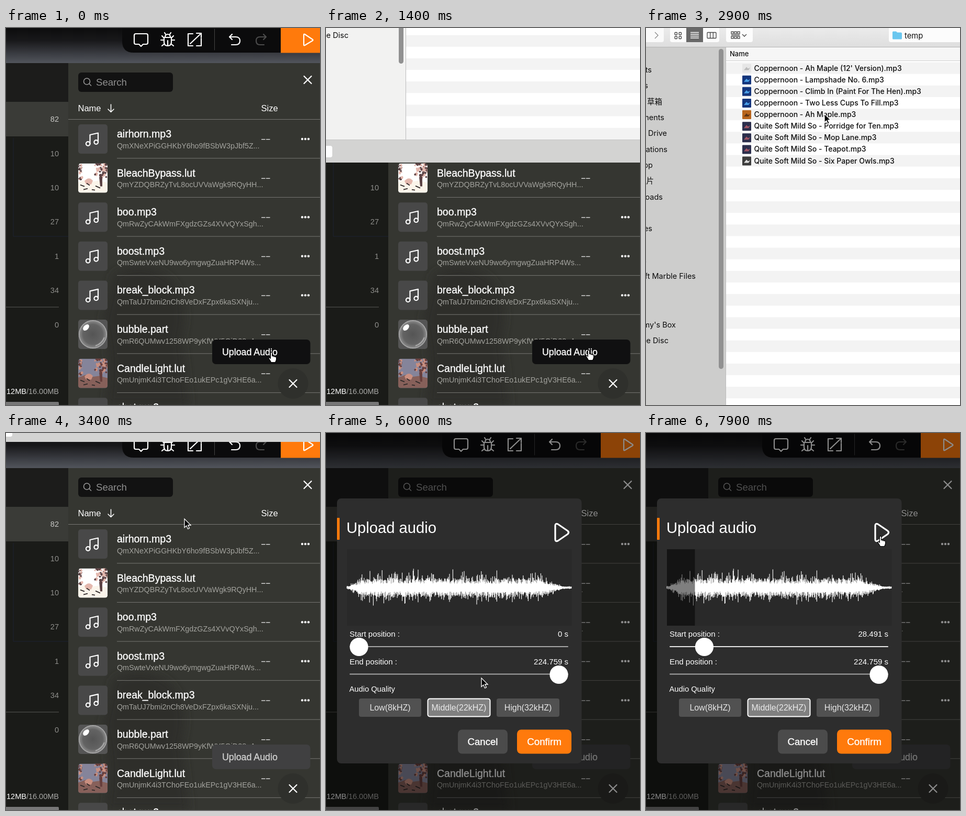
An HTML page that plays this animation: 600x720 px, repeating every 8000 ms.

```html
<!DOCTYPE html>
<html lang="en">
<head>
<meta charset="utf-8">
<title>Upload audio</title>
<style>
html, body { margin: 0; width: 100%; height: 100%; overflow: hidden; background: #1a1b18; }
svg { display: block; width: 600px; height: 720px; font-family: "Liberation Sans", Arial, sans-serif; }
#sheet { font-family: Inter, "Noto Sans CJK SC", "Noto Sans CJK", sans-serif; }
.line { fill: none; stroke: #fff; stroke-width: 2.2; stroke-linecap: round; stroke-linejoin: round; }
</style>
</head>
<body>
<svg viewBox="0 0 600 720" xmlns="http://www.w3.org/2000/svg">
  <defs>
    <linearGradient id="sky" x1="0" y1="0" x2="0" y2="1">
      <stop offset="0" stop-color="#0c0c0d"/><stop offset=".35" stop-color="#18181a"/>
      <stop offset=".75" stop-color="#3d3f45"/><stop offset="1" stop-color="#53565d"/>
    </linearGradient>
    <linearGradient id="bar" x1="0" y1="0" x2="0" y2="1">
      <stop offset="0" stop-color="#ebebeb"/><stop offset="1" stop-color="#dedede"/>
    </linearGradient>
    <radialGradient id="ball">
      <stop offset="0" stop-color="#555"/><stop offset=".7" stop-color="#636363"/>
      <stop offset=".92" stop-color="#858585"/><stop offset="1" stop-color="#c4c4c4"/>
    </radialGradient>
    <filter id="soft"><feGaussianBlur stdDeviation="9"/></filter>
    <clipPath id="thumb"><rect width="56" height="56" rx="5"/></clipPath>
  </defs>
  <g id="app"></g>
  <rect id="dim" width="600" height="720" fill="#000" opacity=".45"/>
  <g id="modal"></g>
  <g id="sheet"></g>
  <path id="arrow" d="M0 0V16.5L3.8 13 6.6 19.2 9.4 18 6.7 12H12Z" fill="#000" stroke="#fff" stroke-width="1.3"/>
  <path id="hand" d="M-1.6 1.5C-1.6-.6 1.6-.6 1.6 1.5V8C2.2 6.6 4.5 6.8 4.6 8.4C5.2 7.4 7 7.8 7.2 9.2C8 8.6 9.6 9 9.6 10.5V14C9.6 16 8.2 17 7.8 19.5H-.5C-1 17-4.5 13.5-5 11.8C-5 10-3 10.2-1.6 12Z"
    fill="#fff" stroke="#000" stroke-width="1.2"/>
</svg>
<script>
const $ = id => document.getElementById(id);
const LOOP = 8000, STEP = 100, LENGTH = 224.759, START = 28.491;

const text = (x, y, s, size, fill = '#fff', more = '') =>
  `<text x="${x}" y="${y + size * .36}" font-size="${size}" fill="${fill}" ${more}>${s}</text>`;
const rect = (x, y, w, h, fill, rx = 0, more = '') =>
  `<rect x="${x}" y="${y}" width="${w}" height="${h}" fill="${fill}" rx="${rx}" ${more}/>`;
const line = (d, more = '') => `<path class="line" d="${d}" ${more}/>`;
const circle = (x, y, r, fill, more = '') => `<circle cx="${x}" cy="${y}" r="${r}" fill="${fill}" ${more}/>`;
const END = 'text-anchor="end"', MID = 'text-anchor="middle"';
const STRONG = 'stroke="#fff" stroke-width=".35"';

function random(seed) {
  return () => (seed = (seed * 16807) % 2147483647) / 2147483647;
}

// Thumbnails, each drawn in a 56 px square
const note = rect(0, 0, 56, 56, '#484848', 5) +
  line('M22.500 37V20L38 16.500V34') +
  '<circle class="line" cx="18.700" cy="37" r="3.800"/><circle class="line" cx="34.200" cy="34" r="3.800"/>';

function scene(sky, leaf, ground, light) {
  const rnd = random(77);
  let s = rect(0, 0, 56, 56, sky);
  for (let i = 0; i < 60; i++)
    s += circle(32 + rnd() * 25, rnd() * 27, 1 + rnd() * 2, i % 2 ? leaf : light);
  for (let i = 0; i < 24; i++)
    s += circle(rnd() * 8, 3 + rnd() * 28, 1 + rnd() * 1.500, i % 2 ? leaf : light);
  s += `<path d="M0 36L14 31 24 35 40 33 56 37V56H0Z" fill="${ground}"/>`;
  s += `<path d="M12 34Q20 24 28 33L25 40H15Z" fill="${light}"/><path d="M40 26L46 25V44H42Z" fill="${leaf}"/>`;
  s += '<path d="M4 41L12 44M16 38L22 42M33 43L42 47M10 50L18 48M26 50L32 51" stroke="#302a2a" stroke-width="1.800"/>';
  return `<g clip-path="url(#thumb)">${s}</g>`;
}
const bubble = rect(0, 0, 56, 56, '#555', 5) + circle(28, 28, 27, 'url(#ball)') +
  '<ellipse cx="15" cy="15" rx="7" ry="4.500" fill="#fff" transform="rotate(-45 15 15)"/>' +
  '<path d="M33 50Q45 46 50 34" fill="none" stroke="#aaa" stroke-width="2"/>';
const bleach = scene('#fff', '#5b4244', '#fbf4ea', '#e3b7ad');
const candle = scene('#85849a', '#673f3d', '#87605a', '#c98f80');

const files = [
  ['airhorn.mp3', 'QmXNeXPiGGHKbY6ho9fBSbW3pJbf5Z...', note],
  ['BleachBypass.lut', 'QmYZDQBRZyTvL8ocUVVaWgk9RQyHH...', bleach],
  ['boo.mp3', 'QmRwZyCAkWmFXgdzGZs4XVvQYxSgh...', note],
  ['boost.mp3', 'QmSwteVxeNU9wo6ymgwgZuaHRP4Ws...', note],
  ['break_block.mp3', 'QmTaUJ7bmi2nCh8VeDxFZpx6kaSXNju...', note],
  ['bubble.part', 'QmR6QUMwv1258WP9yKfWY5GiD28nA...', bubble],
  ['CandleLight.lut', 'QmUnjmK4i3TChoFEo1ukEPc1gV3HE6a...', candle],
  ['chat.mp3', '', note],
];

function buildApp() {
  let s = rect(0, 0, 600, 68, 'url(#sky)');
  s += '<path d="M222 0H600V47H244Q222 47 222 25Z" fill="#0b0b0c"/>' + rect(525, 0, 75, 47.500, '#ff7a0c');
  s += line('M248 11H268Q271 11 271 14V28Q271 31 268 31H262L258 35 254 31H248Q245 31 245 28V14Q245 11 248 11Z');
  s += line('M302 18H316V27Q316 34 309 34T302 27ZM304 18Q304 12 309 12T314 18M309 24V34M305 12L303 9M313 12L315 9' +
    'M302 23H296M316 23H322M302 19L298 15M316 19L320 15M303 30L298 34M315 30L320 34');
  s += line('M357 11H348V25M364 34H373V20M352 30L372 11M364 10H373V18M348 26V34H357');
  s += line('M398.500 2V42', 'style="stroke:#444;stroke-width:1"');
  s += line('M432 12L427 17L432 22M427 17H439Q447 17 447 24.500T439 32H431');
  s += line('M492 12L497 17L492 22M497 17H485Q478 17 478 24.500T485 32H493', 'style="stroke:#4c4c4c"');
  s += line('M569 13V32Q569 34 571 33L586 24Q587 23 586 22L571 12Q569 11 569 13Z');

  // Left column
  s += rect(0, 67, 120, 653, '#1a1b18') + rect(0, 67, 119, 74, '#1c1c1b') + rect(0, 141, 119, 66, '#3a3b37');
  s += '<path d="M14 210V398H119" fill="none" stroke="#1d2233"/>';
  [[82, 174], [10, 239.500], [10, 305], [27, 370], [1, 435.500], [34, 501], [0, 567]].forEach(([n, y], i) =>
    s += text(101, y, n, 14.500, i ? '#8e8e8b' : '#c9c9c6', END));
  s += rect(0, 532.500, 101, 1, '#5a5a57') + rect(-5, 714, 106, 8, '#777', 2);
  s += text(101, 693.500, '<tspan fill="#fff">12MB</tspan>/16.00MB', 14.500, '#a8a8a6', END);

  // Asset panel
  s += rect(119, 67, 481, 653, '#353631');
  s += '<path d="M205 470Q260 440 310 475Q355 520 335 590L350 720H190Q205 640 185 560Z" fill="#2d2d2a" filter="url(#soft)"/>';
  s += rect(138, 85, 181, 37, '#121212', 6) + text(172, 103, 'Search', 18.600, '#8f8f8f');
  s += '<g style="stroke:#999"><circle cx="154.500" cy="102" r="6" fill="none" stroke-width="1.600"/><path d="M159 106.500L163 110.500" stroke-width="1.600"/></g>';
  s += line('M569.500 92L583.500 106M583.500 92L569.500 106');
  s += text(137.500, 153, 'Name', 16.500) + text(487.500, 153, 'Size', 16.500);
  s += line('M200.500 146V160M195 155L200.500 160.500L206 155', 'style="stroke-width:1.600"');
  s += rect(119, 174, 481, 1, '#777773');
  files.forEach(([name, hash, art], i) => {
    const y = i * 74.600;
    s += `<g transform="translate(138 ${184 + y})">${art}</g>`;
    s += text(212, 202 + y, name, 19.500, '#fff', STRONG) + text(212, 224.500 + y, hash, 14.300, '#a3a39e');
    s += rect(488, 212 + y, 7.500, 1.400, '#ddd') + rect(497, 212 + y, 7.500, 1.400, '#ddd');
    if (art === note) s += [566, 572, 578].map(x => circle(x, 212 + y, 2.200, '#fff')).join('');
    s += rect(212, 248.300 + y, 388, 1, '#777773');
  });
  s += circle(548.500, 679, 29, '#2f302c');
  s += line('M541.500 672L555.500 686M555.500 672L541.500 686');
  s += rect(394, 595, 187.500, 47, '#404041', 7, 'id="upload"');
  s += text(413, 618.500, 'Upload Audio', 17.800, '#fff', 'id="uploadText" stroke-width=".35"');
  return s;
}

function wavePath() {
  const rnd = random(4242);
  let d = '';
  for (let x = 40; x < 469; x += .8) {
    const rise = Math.min(1, Math.max(.07, (x - 42) / 28));
    const fall = Math.min(1, Math.max(.05, (455 - x) / 50));
    const env = Math.min(rise, fall);
    const reach = () => 1 + env * (6 + 11 * rnd() + 19 * rnd() ** 9);
    d += `M${x.toFixed(1)} ${(295 - reach()).toFixed(1)}V${(295.500 + reach()).toFixed(1)}`;
  }
  return d;
}

function buildModal() {
  let s = rect(21, 125, 467.500, 506, '#2d2d2d', 8) + rect(21, 162, 5, 42, '#ff7a0c', 1);
  s += text(39, 180.500, 'Upload audio', 29.200);
  s += line('M438 177V203Q438 208 443 206L462 193Q465 190 462 187L443 174Q438 172 438 177Z', 'style="stroke-width:3.200"');
  s += rect(40, 222, 429.500, 146, '#292929');
  s += `<path d="${wavePath()}" stroke="#fff" stroke-width="1.100"/>`;
  s += rect(40, 222, 0, 146, '#000', 0, 'id="mask" opacity=".5"');
  s += text(45, 384, 'Start position :', 15) + text(463, 384, '', 15, '#fff', END + ' id="startText"');
  s += rect(45, 407, 418, 2, '#a6a6a6', 1, 'id="track"') + circle(63, 408.500, 17.600, '#fff', 'id="knob"');
  s += text(45, 436.500, 'End position :', 15) + text(463, 436.500, LENGTH + ' s', 15, '#fff', END);
  s += rect(45, 459.500, 418, 2, '#a6a6a6', 1) + circle(445, 461.500, 17.600, '#fff');
  s += text(44.500, 489, 'Audio Quality', 14.700);
  s += rect(63, 507, 119, 35, '#515151', 4) + text(122.500, 524, 'Low(8kHZ)', 16, '#e6e6e6', MID);
  s += rect(194.500, 507.500, 119, 34, '#808080', 4, 'stroke="#fff" stroke-width="2"') + text(254, 524, 'Middle(22kHZ)', 16, '#e9e9e9', MID);
  s += rect(326, 507, 120, 35, '#515151', 4) + text(386, 524, 'High(32kHZ)', 16, '#e6e6e6', MID);
  s += rect(252, 566.500, 95, 46, '#4b4b4b', 8) + text(299.500, 589, 'Cancel', 18.600, '#fff', MID + ' ' + STRONG);
  s += rect(365, 566.500, 104, 46, '#ff7a0c', 8) + text(417, 589, 'Confirm', 18.800, '#fff', MID + ' ' + STRONG);
  return s;
}

const songs = [
  "Coppernoon - Ah Maple (12' Version)", 'Coppernoon - Lampshade No. 6', 'Coppernoon - Climb In (Paint For The Hen)',
  'Coppernoon - Two Less Cups To Fill', 'Coppernoon - Ah Maple', 'Quite Soft Mild So - Porridge for Ten',
  'Quite Soft Mild So - Mop Lane', 'Quite Soft Mild So - Teapot', 'Quite Soft Mild So - Six Paper Owls',
];
const covers = ['#e6e6e6', '#14357c', '#14357c', '#14357c', '#b8651c', '#2b2e4c', '#2b2e4c', '#2b2e4c', '#3c3c3c'];
const spots = ['#bbb', '#4aa0e8', '#4aa0e8', '#4aa0e8', '#5f3515', '#a05464', '#a05464', '#a05464', '#ddd'];
const places = [
  ['ts', 11, 80], ['s', 4, 110], ['草箱', 31, 140.500], ['ments', 35, 171], ['Drive', 40, 201], ['ations', 41, 231.500],
  ['op', 13, 262], ['片', 15, 292], ['oads', 32, 322.500], ['es', 12, 383], ['s', 1, 443.500],
  ['ft Marble Files', 95, 473.500], ["my's Box", 57, 567], ['e Disc', 43, 597],
];

function buildSheet() {
  const dark = 'stroke="#444" stroke-width="1.300" fill="none"';
  let s = rect(0, 0, 600, 840, '#fff') + rect(0, 36, 152.500, 760, '#cdcdcc', 0, 'id="side"');
  for (let i = 0; i < 33; i += 2) s += rect(153, 65.500 + i * 22.130, 447, 22.130, '#f3f3f3');
  s += rect(153, 37, 447, 26, '#f6f6f6') + rect(153, 62, 447, 1, '#d0d0d0');
  s += text(160, 49, 'Name', 13, '#111', 'font-weight="500"');
  s += rect(152, 36, 1, 760, '#bcbcbc') + rect(139, 40, 9, 611, '#919191', 4.500);
  places.forEach(([name, x, y]) => s += text(x, y, name, 14.500, '#0c0c0c', END));

  s += rect(0, 0, 600, 36, 'url(#bar)') + rect(0, 36, 600, 1, '#b4b4b4');
  s += rect(-10, -2, 44, 29, '#fafafa', 4) + `<path d="M17 8L23 14L17 20" ${dark} style="stroke:#888"/>`;
  s += rect(46, -2, 94, 29, '#fcfcfc', 4) + rect(77, -2, 32, 29, '#686868');
  for (const x of [55, 63]) for (const y of [8.500, 16]) s += rect(x, y, 4.500, 4.500, 'none', 1, dark);
  s += '<path d="M85 8.500H101M85 12H101M85 15.500H101M85 19H101" stroke="#fff" stroke-width="1.400"/>';
  s += rect(117, 8.500, 17, 11, 'none', 1, dark) + `<path d="M122.700 8.500V19.500M128.300 8.500V19.500" ${dark}/>`;
  s += rect(153, -2, 51, 29, '#fcfcfc', 4);
  for (let i = 0; i < 6; i++) s += rect(163 + i % 3 * 6, 7 + (i > 2) * 9, 4, 4, 'none', 0, dark);
  s += `<path d="M163 13.500H179M184 12L188 16L192 12" ${dark}/>`;
  s += rect(464, -2, 150, 29, '#fcfcfc', 4);
  s += '<path d="M471 8Q471 6.500 472.500 6.500H478L480 8.500H487Q489 8.500 489 10.500V20Q489 21.500 487.500 21.500H472.500Q471 21.500 471 20Z" fill="#6ac7ef"/>';
  s += text(494, 14.500, 'temp', 14.800, '#111');

  songs.forEach((name, i) => {
    const y = 76.500 + i * 22.130;
    s += rect(184, y - 8, 17, 17, covers[i], 1);
    s += `<path d="M187 ${y + 4}L192 ${y - 2}L195 ${y + 1}L199 ${y - 1}L196 ${y + 4}Z" fill="${spots[i]}"/>`;
    s += text(206.500, y, name + '.mp3', 14, '#0c0c0c', 'font-weight="500"');
  });
  s += rect(0, 796, 600, 44, '#d3d3d2') + rect(0, 796, 600, 1, '#c4c4c4') + rect(-60, 808, 72, 22, '#fff', 4);
  return s;
}

$('app').innerHTML = buildApp();
$('modal').innerHTML = buildModal();
$('sheet').innerHTML = buildSheet();

const progress = (t, a, b) => Math.min(1, Math.max(0, (t - a) / (b - a)));
const ease = u => u * u * (3 - 2 * u);

// Pointer tip: time, x, y
const path = [
  [0, 507, 619], [1100, 507, 619], [1400, 502, 615], [1800, 502, 615], [2600, 341, 164], [5400, 341, 164],
  [6000, 297, 468], [6400, 61, 403], [6600, 61, 403], [7200, 109, 403], [7700, 448, 197], [8000, 448, 197],
];
function pointer(t) {
  const i = path.findIndex((p, k) => k && t <= p[0]);
  const [t0, x0, y0] = path[i - 1], [t1, x1, y1] = path[i];
  const u = ease(progress(t, t0, t1));
  return [x0 + (x1 - x0) * u, y0 + (y1 - y0) * u];
}

const set = (id, name, value) => $(id).setAttribute(name, value);
const show = (id, on) => set(id, 'visibility', on ? 'visible' : 'hidden');

function draw(t) {
  const open = ease(progress(t, 1250, 1658)) - ease(progress(t, 3080, 3430));
  set('sheet', 'transform', `translate(0 ${Math.round(-840 * (1 - open))})`);
  show('sheet', open > 0);
  set('side', 'fill', open < 1 ? '#f2f2f1' : '#cdcdcc');

  const hover = t < 1600;
  set('upload', 'fill', hover ? '#101011' : '#404041');
  set('uploadText', 'fill', hover ? '#fff' : '#cfcfcf');
  set('uploadText', 'stroke', hover ? '#fff' : '#cfcfcf');

  const editing = t >= 3800;
  show('dim', editing);
  show('modal', editing);

  const drag = ease(progress(t, 6600, 7200));
  const share = START / LENGTH * drag;
  set('knob', 'cx', 63 + 382 * share);
  set('mask', 'width', 422 * share);
  set('track', 'fill', drag > 0 ? '#e8e8e8' : '#a6a6a6');
  $('startText').textContent = (drag ? (START * drag).toFixed(3) : '0') + ' s';

  const [x, y] = pointer(t);
  const hand = hover || (t >= 6400 && t <= 7200) || t >= 7600;
  show('hand', hand);
  show('arrow', !hand);
  for (const id of ['hand', 'arrow']) set(id, 'transform', `translate(${x} ${y})`);
}

const begin = performance.now();
function tick() {
  const t = (performance.now() - begin) % LOOP;
  draw(Math.floor(t / STEP) * STEP);
  requestAnimationFrame(tick);
}
tick();
</script>
</body>
</html>
```
